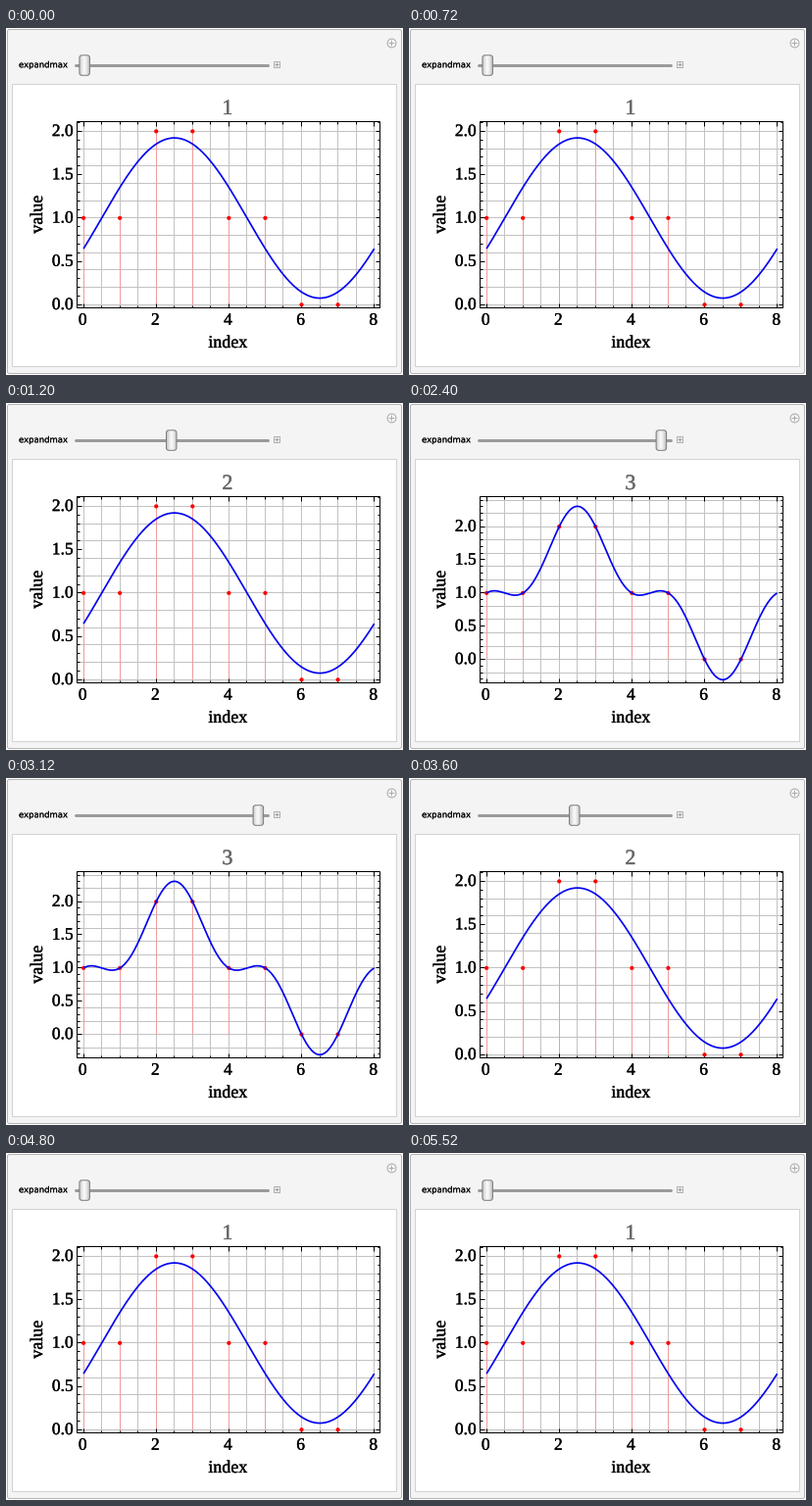
Animation, 405 px wide and 354 px high, one loop 6000 ms. Source, as a matplotlib script:

```python
import numpy as np
import matplotlib.pyplot as plt
from matplotlib.animation import FuncAnimation
from matplotlib.patches import Circle, FancyBboxPatch, Rectangle
from matplotlib.patheffects import withStroke

W, H, DPI = 405, 354, 64
PT = 72 / DPI  # points per pixel
LEFT, RIGHT, TOP, BOTTOM = 72.5, 381.5, 95.5, 285.5
SAMPLES = [1, 1, 2, 2, 1, 1, 0, 0]
ORDERS = [1, 2, 3, 2, 1]
GRID = "#c2c2c2"

plt.rcParams["text.hinting"] = "none"
fig = plt.figure(figsize=(W / DPI, H / DPI), dpi=DPI, facecolor="white")
ax = fig.add_axes([0, 0, 1, 1])


def line(x, y, color, width=1.0, z=2, cap="butt"):
    ax.plot(x, y, color=color, lw=width * PT, zorder=z,
            solid_capstyle=cap, solid_joinstyle="round")


# Snapping rounds straight strokes up, so half a pixel is taken off first.
def rule(x0, y0, x1, y1, color, width=1.0, z=2, cap="butt"):
    line([x0 - 0.5, x1 - 0.5], [y0 - 0.5, y1 - 0.5], color, width, z, cap)


def rect(x0, y0, x1, y1, face, edge, z=1):
    ax.add_patch(Rectangle((x0 - 0.5, y0 - 0.5), x1 - x0, y1 - y0,
                           fc=face, ec=edge, lw=PT, zorder=z))


def rounded(x, y, w, h, r, face, edge, z=1):
    box = FancyBboxPatch((x, y), w, h, boxstyle=f"round,pad=0,rounding_size={r}",
                         fc=face, ec=edge, lw=PT, zorder=z)
    return ax.add_patch(box)


def text(x, y, s, size, color="black", ha="center", font="Liberation Serif",
         rot=0, weight=0.35):
    ax.text(x, y, s, fontsize=size * PT, color=color, ha=ha, va="baseline",
            family=font, rotation=rot, rotation_mode="anchor", zorder=8,
            path_effects=[withStroke(linewidth=weight * PT, foreground=color)])


def plus(x, y, r, color):
    rule(x - r, y, x + r, y, color)
    rule(x, y - r, x, y + r, color)


def series(t, order):
    w = 2 * np.pi / len(SAMPLES) * (t - 2.5)
    y = 1 + np.cos(np.pi / 8) * np.cos(w)
    if order >= 3:
        y = y + np.sin(np.pi / 8) * np.cos(3 * w)
    return y


def draw_panel(order):
    rounded(1.5, 1.5, 402, 351, 2, "#f4f4f4", "#b5b5b5", 0)
    rect(6.5, 57.5, 398.5, 345.5, "white", "#d2d2d2")
    ax.add_patch(Circle((393.5, 15.5), 4.4, fc="white", ec="#b4b4b4", lw=1.2 * PT))
    plus(393.5, 15.5, 3, "#aaaaaa")

    text(13, 40.3, "expandmax", 8.5, ha="left", font="DejaVu Sans", weight=0.1)
    rule(71, 38.5, 267, 38.5, "#9a9a9a", 3, cap="round")
    rect(273.5, 34.5, 279.5, 40.5, "#f8f8f8", "#b0b0b0")
    plus(276.5, 37.5, 2, "#a0a0a0")

    x = 79.9 + 88.6 * (order - 1)
    knob = rounded(x - 5, 27.8, 10.5, 20.5, 2.5, "none", "#7c7c7c", 6)
    shade = 0.97 - 0.28 * np.abs(np.linspace(-0.8, 1, 24)) ** 1.5
    img = ax.imshow(shade[None, :], cmap="gray", vmin=0, vmax=1, aspect="auto",
                    extent=(x - 5, x + 5.5, 48.3, 27.8), zorder=5)
    img.set_clip_path(knob)


def draw_plot(order):
    t = np.linspace(0, 8, 400)
    curve = series(t, order)
    lo, hi = min(0, curve.min()), max(2, curve.max())

    def px(v):
        return 79.1 + 37.07 * np.asarray(v)

    def py(v):
        return 282.3 - (np.asarray(v) - lo) / (hi - lo) * 176.9

    for k in range(17):
        x, major = px(k / 2), k % 4 == 0
        size = 4.5 if major else 2.5
        rule(x, TOP, x, BOTTOM, GRID)
        rule(x, BOTTOM, x, BOTTOM - size, "black", z=4)
        rule(x, TOP, x, TOP + size, "black", z=4)
        if major:
            text(x - 0.9, 302.7, str(k // 2), 17.5)

    for k in range(-4, 26):
        y, major = py(k / 10), k % 5 == 0
        if not TOP < y < BOTTOM:
            continue
        size = 4.5 if major else 2.5
        if k % 2 == 0:
            rule(LEFT, y, RIGHT, y, GRID)
        rule(LEFT, y, LEFT + size, y, "black", z=4)
        rule(RIGHT, y, RIGHT - size, y, "black", z=4)
        if major:
            text(68.7, y + 4.7, f"{k / 10:.1f}", 17.5, ha="right")

    for n, v in enumerate(SAMPLES):
        x = px(n)
        rule(x, py(0), x, py(v), "#ee9c9c", z=3)
        ax.add_patch(Circle((x, py(v)), 2.1, fc="red", lw=0, zorder=5))

    line(px(t), py(curve), "#0000f0", 1.7, z=6)
    rect(LEFT, TOP, RIGHT, BOTTOM, "none", "black", z=4)
    text(226.3, 326, "index", 18)
    text(37, 190.2, "value", 18, rot=90)
    text(225.9, 88, str(order), 22, "#666666")


def update(i):
    ax.clear()
    ax.axis("off")
    draw_panel(ORDERS[i])
    draw_plot(ORDERS[i])
    ax.set(xlim=(0, W), ylim=(H, 0))
    return []


anim = FuncAnimation(fig, update, frames=len(ORDERS), init_func=lambda: [],
                     interval=1200, repeat=True, repeat_delay=0)
plt.show()
```
